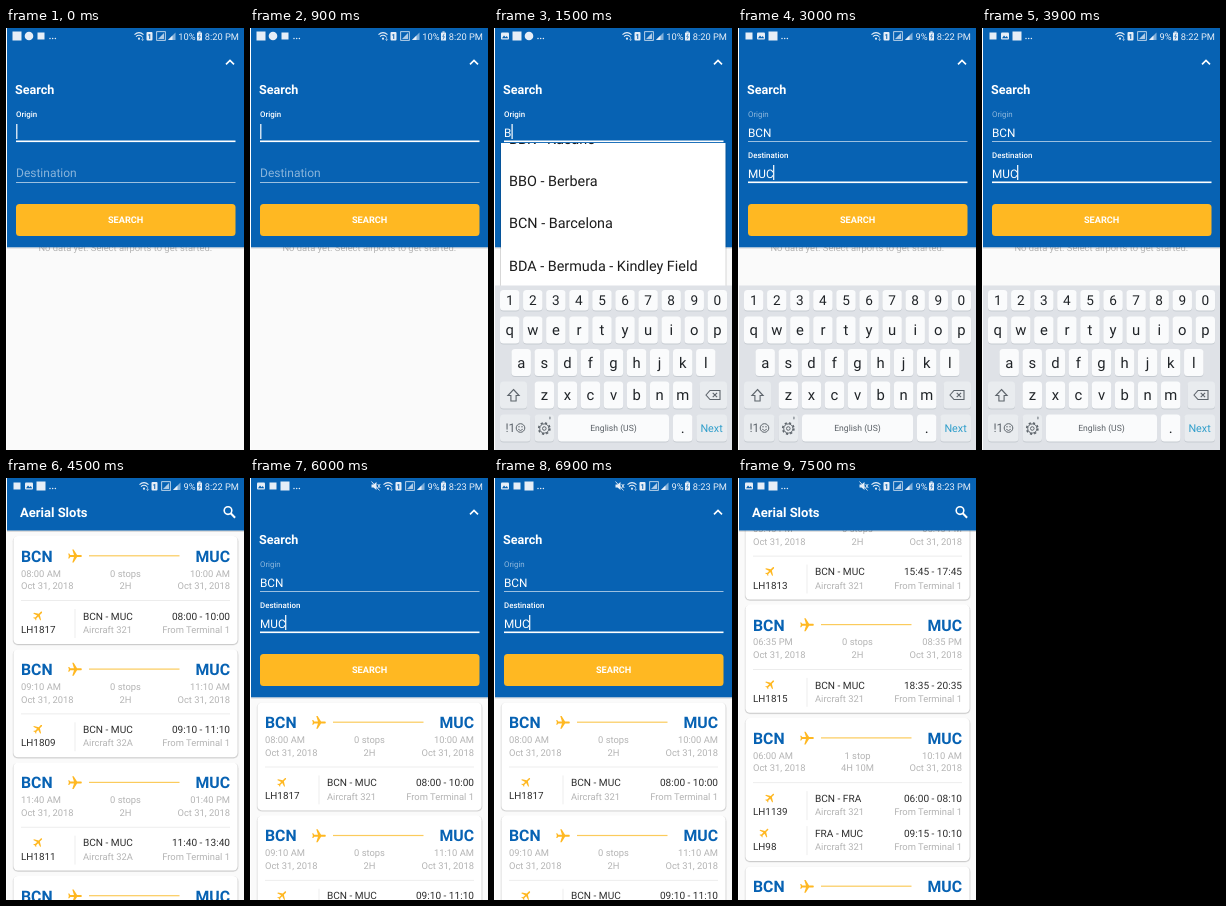
These frames come from a looping animation (238 by 422 pixels, 8000 ms). An HTML page:

```html
<!DOCTYPE html>
<html lang="en">
<head>
<meta charset="utf-8">
<title>Flight search</title>
<style>
  html, body { margin: 0; width: 100%; height: 100%; overflow: hidden; background: #fff; }
  svg { display: block; width: 100vw; height: 100vh; }
  text { font-family: Roboto, sans-serif; text-rendering: geometricPrecision; white-space: pre; }
</style>
</head>
<body>
<svg id="stage" viewBox="0 0 238 422"></svg>
<script>
const BLUE = '#0762b3', YELLOW = '#ffb822', GRAY = '#b4b4b4', DARK = '#2d2d2d';
const KEY = '#fafbfc', SIDE_KEY = '#e9ecef', INK = '#202428';
const LOOP = 8000, STEP = 1500;

const rect = (x, y, w, h, fill, r = 0, more = '') =>
  `<rect x="${x}" y="${y}" width="${w}" height="${h}" rx="${r}" fill="${fill}" ${more}/>`;
const text = (s, x, y, size, fill, anchor = 'start', weight = 400, more = '') =>
  `<text x="${x}" y="${y}" font-size="${size}" fill="${fill}" text-anchor="${anchor}" font-weight="${weight}" ${more}>${s}</text>`;
const stroke = (d, color, w = 1, more = '') =>
  `<path d="${d}" fill="none" stroke="${color}" stroke-width="${w}" ${more}/>`;
const circle = (x, y, r, fill, more = '') =>
  `<circle cx="${x}" cy="${y}" r="${r}" fill="${fill}" ${more}/>`;
const group = (x, y, body) => `<g transform="translate(${x} ${y})">${body}</g>`;

const plane = (x, y, angle, scale) =>
  `<path transform="translate(${x} ${y}) rotate(${angle}) scale(${scale}) translate(-11.5 -12)" fill="${YELLOW}"
    d="M21 16v-2l-8-5V3.5c0-.83-.67-1.5-1.5-1.5S10 2.67 10 3.5V9l-8 5v2l8-2.5V19l-2 1.5V22l3.5-1 3.5 1v-1.5L13 19v-5.5l8 2.5z"/>`;

// Status bar
const notices = {
  square: rect(-4.5, -4.5, 9, 9, '#e6eef7'),
  small: rect(-3.5, -3.5, 7, 7, '#e6eef7'),
  dot: circle(0, 0, 4.3, '#e6eef7'),
  photo: rect(-4, -3.5, 8, 7, '#e6eef7', 1) + `<path d="M-3 2.3L-1 -.6L.6 1.2L1.8 0L3.2 2.3z" fill="${BLUE}"/>`
};

function statusBar({ icons, charge, clock, muted }) {
  const c = '#e6eef7', shift = charge.length < 3 ? 5 : 0;
  const bars = x => `<path d="M${x} 12h7.5V4.5z" fill="${c}" opacity=".55"/><path d="M${x} 12h4.5V7.5z" fill="${c}"/>`;
  let s = icons.map((name, i) => group(11 + 12 * i, 8, notices[name])).join('');
  for (let i = 0; i < 3; i++) s += circle(44 + 2.7 * i, 10.6, .75, c);
  if (muted) s += `<path d="M121.5 6.5h2l3-2.5v8l-3-2.5h-2z" fill="${c}"/>` + stroke('M121.5 3.5l8 9M127.7 6l2.5 4m0-4l-2.5 4', c, .9);
  s += group(shift, 0,
    stroke('M128.5 6.6q4.5-4 9 0M130 8.6q3-2.6 6 0', c, 1.1) + circle(133, 10.7, 1.1, c) +
    stroke('M136.6 8.5v4m-1.2-1.2l1.2 1.2l1.2-1.2', c, .6) +
    rect(140.5, 4, 6, 8.5, c, 1) + text('1', 143.5, 10.8, 7, BLUE, 'middle', 700) +
    rect(150.7, 3.7, 8.6, 8.6, 'none', 0, `stroke="${c}" stroke-width=".8"`) +
    `<path d="M152 11h6V5z" fill="${c}" opacity=".75"/>` + bars(162));
  s += text(charge, 189.5, 11.6, 9.3, c, 'end');
  s += rect(191, 4.5, 5, 8, c, .6) + rect(192.4, 3.4, 2.2, 1.2, c);
  s += stroke('M194.2 5.8l-1.5 2.9h1.7l-1.4 2.6', BLUE, .7);
  return s + text(clock, 198.7, 11.6, 9.3, c);
}

// Search form
function field(label, value, top, focus) {
  const active = focus || value, tone = focus ? 1 : .55;
  const end = { B: 18, MUC: 35.6 }[value] || 10.7;
  let s = active
    ? text(label, 10, top, 7.9, '#fff', 'start', focus ? 500 : 400, `opacity="${tone}"`)
    : text(label, 10, top + 19, 12, '#fff', 'start', 400, 'opacity=".52"');
  s += text(value, 10, top + 20, 11.8, '#fff');
  if (focus) s += rect(end - .5, top + 7, 1.2, 15, '#fff');
  return s + (focus ? rect(10, top + 23.5, 219.5, 1.6, '#fff') : rect(10, top + 24, 219.5, 1, '#fff', 0, 'opacity=".6"'));
}

const panel = (origin, dest, focus) =>
  rect(1, 219, 237, 2, '#000', 0, 'opacity=".08"') +
  rect(1, 0, 237, 219.3, BLUE) +
  stroke('M220 36.4l4-4l4 4', '#fff', 1.6) +
  text('Search', 9, 66.3, 12.6, '#fff', 'start', 700) +
  field('Origin', origin, 89, focus === 0) +
  field('Destination', dest, 130, focus === 1) +
  rect(10, 176, 219.5, 32, YELLOW, 3.5) +
  text('SEARCH', 119.6, 195.4, 9.2, '#fff', 'middle', 700);

const hint = text('No data yet. Select airports to get started.', 119.3, 223.4, 9.4, GRAY, 'middle');

function suggestions() {
  const names = ['BBK - Kasane', 'BBO - Berbera', 'BCN - Barcelona', 'BDA - Bermuda - Kindley Field'];
  return rect(6, 115, 226.5, 144, '#000', 1, 'opacity=".14"') + rect(7, 115, 224.5, 144, '#fff') +
    '<clipPath id="list"><rect x="7" y="115" width="225" height="144"/></clipPath><g clip-path="url(#list)">' +
    names.map((n, i) => text(n, 15, 116.2 + 42.1 * i, 14.4, '#1c1c1c')).join('') + '</g>';
}

// Keyboard
function keyboard() {
  const key = (x, y, w, h, fill = KEY) => rect(x, y + 1, w, h, '#c6cbd1', 3.5) + rect(x, y, w, h, fill, 3.5);
  const row = (chars, x, y, h, size) => [...chars].map((ch, i) => {
    const cx = x + 23.07 * i;
    return key(cx - 9.7, y, 19.4, h) + text(ch, cx, y + h / 2 + size * .34, size, INK, 'middle');
  }).join('');
  const line = '#5d646b';
  return rect(1, 257.5, 237, 164.5, '#dfe2e7') +
    row('1234567890', 15.7, 262, 20.5, 13.6) +
    row('qwertyuiop', 15.7, 288.5, 27, 14.8) +
    row('asdfghjkl', 27.2, 321, 27, 14.8) +
    row('zxcvbnm', 50.3, 353.5, 27, 14.8) +
    key(6, 353.5, 27, 27, SIDE_KEY) + key(205.5, 353.5, 27.5, 27, SIDE_KEY) +
    stroke('M19.5 361.5l5.6 6h-3v5.5h-5.2v-5.5h-3z', line, 1.1) +
    stroke('M212 367l4-4.5h10v9h-10zM218.7 364.8l4.4 4.4m0-4.4l-4.4 4.4', line, 1.1) +
    key(6, 386.5, 30.5, 27, SIDE_KEY) + text('!1', 11.5, 404.2, 12, line) +
    circle(26.5, 400, 4.3, 'none', `stroke="${line}"`) + circle(25, 398.8, .7, line) + circle(28, 398.8, .7, line) +
    stroke('M24.2 401.2q2.3 2.6 4.6 0', line, .9) +
    key(40.6, 386.5, 19.4, 27, SIDE_KEY) +
    circle(50.3, 400.5, 5.6, 'none', `stroke="${line}" stroke-width="1.6" stroke-dasharray="2.2 2.198"`) +
    circle(50.3, 400.5, 4.6, 'none', `stroke="${line}"`) + circle(50.3, 400.5, 1.8, 'none', `stroke="${line}"`) +
    rect(55, 388.5, 1.8, 3, '#9aa0a6', .9) +
    key(64, 386.5, 111, 27) + text('English (US)', 119.5, 403, 8.6, '#5a6066', 'middle') +
    key(179, 386.5, 19.4, 27) + text('.', 188.7, 404.5, 15, INK, 'middle') +
    key(202.3, 386.5, 30.7, 27, SIDE_KEY) + text('Next', 217.6, 403.8, 10.8, '#319fcb', 'middle');
}

// Results
const direct = (from, to, dep, arr, flight, craft) =>
  ({ from, to, stops: '0 stops', span: '2H', legs: [['BCN - MUC', `${dep} - ${arr}`, flight, craft]] });
const flights = [
  direct('08:00 AM', '10:00 AM', '08:00', '10:00', 'LH1817', '321'),
  direct('09:10 AM', '11:10 AM', '09:10', '11:10', 'LH1809', '32A'),
  direct('11:40 AM', '01:40 PM', '11:40', '13:40', 'LH1811', '32A'),
  direct('03:45 PM', '05:45 PM', '15:45', '17:45', 'LH1813', '321'),
  direct('06:35 PM', '08:35 PM', '18:35', '20:35', 'LH1815', '321'),
  { from: '06:00 AM', to: '10:10 AM', stops: '1 stop', span: '4H 10M', legs: [
    ['BCN - FRA', '06:00 - 08:10', 'LH1139', '321'], ['FRA - MUC', '09:15 - 10:10', 'LH98', '321']] },
  direct('06:00 AM', '08:00 AM', '06:00', '08:00', 'LH1807', '321')
];

const leg = ([route, hours, flight, craft], i) => group(0, 35 * i,
  plane(15 + flight.length * 2.87, 79.5, 45, .52) +
  text(flight, 15, 97, 9.9, DARK) +
  rect(68.6, 73, .8, 29, '#e8e8e8') +
  text(route, 77, 83.8, 10.1, DARK) + text(hours, 224, 83.8, 10.1, DARK, 'end') +
  text(`Aircraft ${craft}`, 77, 97.2, 9.4, GRAY) + text('From Terminal 1', 224, 97.2, 9.4, GRAY, 'end'));

function card(f, y) {
  const h = 73 + 35 * f.legs.length, day = 'Oct 31, 2018';
  return group(0, y,
    rect(6.6, .2, 226, h + 1.2, '#000', 5, 'opacity=".07"') + rect(7, .6, 225.2, h + .3, '#000', 5, 'opacity=".12"') +
    rect(7.4, 0, 224.2, h, '#fff', 4.5) +
    text('BCN', 15, 25.8, 15.8, BLUE, 'start', 700) + text('MUC', 224, 25.8, 15.8, BLUE, 'end', 700) +
    plane(69, 20, 90, .68) + rect(83, 19.2, 90.5, 1.2, '#fbcb5c') +
    text(f.from, 15, 40.6, 9.4, GRAY) + text(f.stops, 119.5, 40.6, 9.4, GRAY, 'middle') + text(f.to, 224, 40.6, 9.4, GRAY, 'end') +
    text(day, 15, 53.3, 9.4, GRAY) + text(f.span, 119.5, 53.3, 9.4, GRAY, 'middle') + text(day, 224, 53.3, 9.4, GRAY, 'end') +
    rect(15, 64.2, 209, .8, '#e8e8e8') + f.legs.map(leg).join(''));
}

function cards(first, y) {
  let s = '';
  for (let i = first; i < flights.length && y < 422; i++) {
    s += card(flights[i], y);
    y += 78.3 + 35 * flights[i].legs.length;
  }
  return s;
}

const header =
  rect(1, 52, 237, 2, '#000', 0, 'opacity=".12"') + rect(1, 0, 237, 52.5, BLUE) +
  text('Aerial Slots', 14, 38.8, 13, '#fff', 'start', 700) +
  circle(222, 32.6, 3.8, 'none', 'stroke="#fff" stroke-width="1.6"') + stroke('M224.7 35.3l4.4 4.4', '#fff', 2);

const scenes = [
  [hint + panel('', '', 0), { icons: ['square', 'dot', 'small'], charge: '10%', clock: '8:20 PM' }],
  [panel('B', '', 0) + suggestions() + keyboard(), { icons: ['photo', 'square', 'dot'], charge: '10%', clock: '8:20 PM' }],
  [hint + panel('BCN', 'MUC', 1) + keyboard(), { icons: ['small', 'photo', 'square'], charge: '9%', clock: '8:22 PM' }],
  [cards(0, 58) + header, { icons: ['small', 'photo', 'square'], charge: '9%', clock: '8:22 PM' }],
  [cards(0, 224.4) + panel('BCN', 'MUC', 1), { icons: ['photo', 'small', 'square'], charge: '9%', clock: '8:23 PM', muted: true }],
  [cards(3, 13.5) + header, { icons: ['photo', 'small', 'square'], charge: '9%', clock: '8:23 PM', muted: true }]
].map(([body, bar]) => rect(1, 0, 237, 422, '#fafafa') + body + statusBar(bar));

const stage = document.getElementById('stage');
let shown = -1;

function update(time) {
  const scene = Math.floor((time % LOOP) / STEP);
  if (scene === shown) return;
  shown = scene;
  stage.innerHTML = scenes[scene];
}

function tick() {
  update(performance.now());
  requestAnimationFrame(tick);
}
tick();
</script>
</body>
</html>
```
